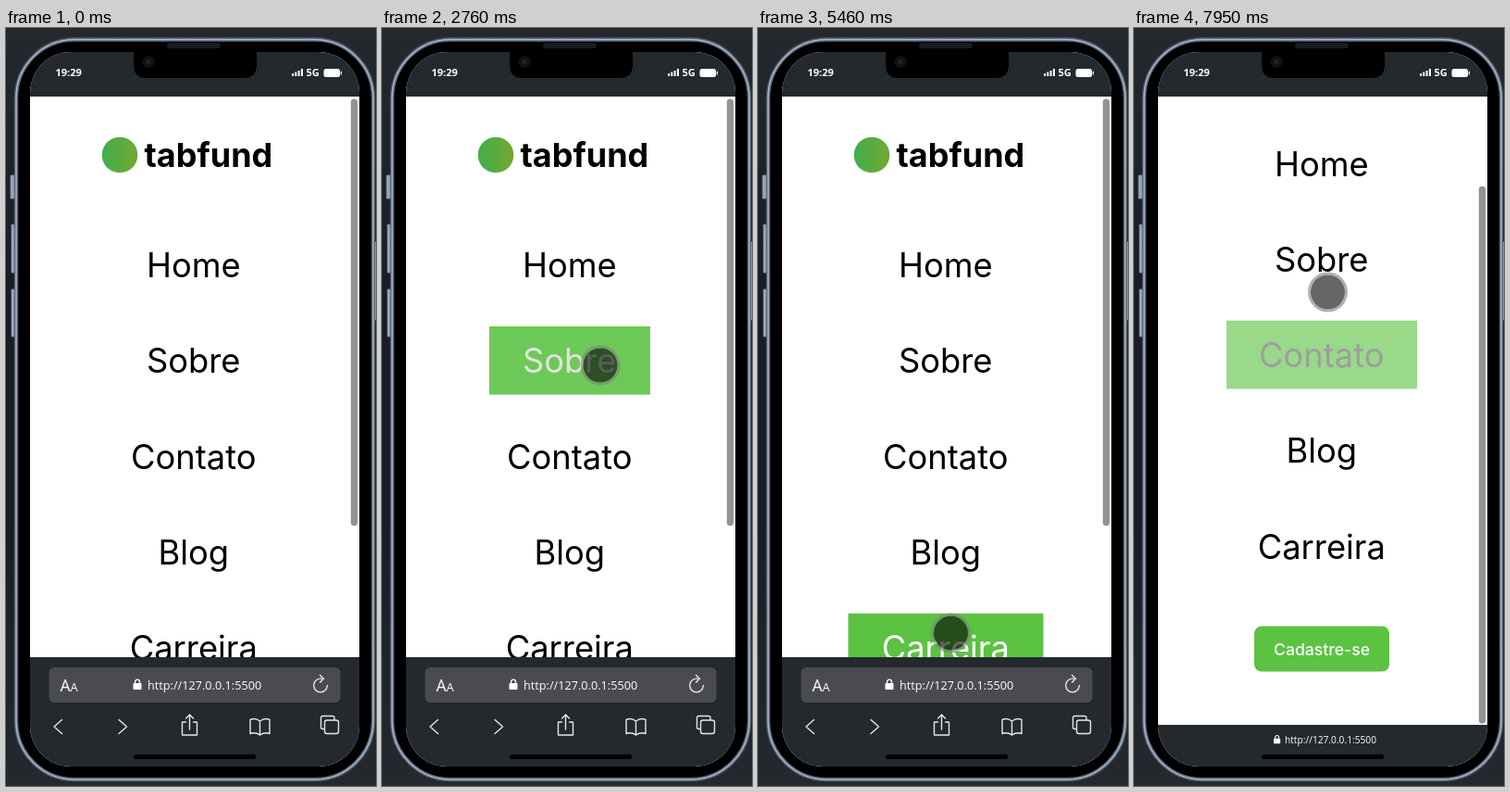
An HTML page that plays this animation: 400x818 px, repeating every 7.99 s.

```html
<!DOCTYPE html>
<html lang="pt-BR">
<head>
<meta charset="utf-8">
<title>Menu no celular</title>
<style>
  html, body { margin: 0; width: 100%; height: 100%; overflow: hidden; background: #22272c; }
  svg { display: block; width: 100%; height: 100%; }
  .page { font-family: Inter, sans-serif; }
  .link { font-size: 36.3px; text-anchor: middle; }
  .system { font-family: "Open Sans", sans-serif; fill: #fff; }
  .icon { fill: none; stroke: #e4e6e8; stroke-width: 1.4; stroke-linecap: round; stroke-linejoin: round; }
</style>
</head>
<body>
<svg viewBox="0 0 400 818">
  <defs>
    <clipPath id="screen"><rect x="26" y="26" width="356" height="771" rx="44"/></clipPath>
    <linearGradient id="backdrop" x2="0" y2="1">
      <stop stop-color="#24292e"/><stop offset=".35" stop-color="#191c25"/>
      <stop offset=".65" stop-color="#191c25"/><stop offset="1" stop-color="#24292e"/>
    </linearGradient>
    <linearGradient id="logo"><stop stop-color="#41ae4b"/><stop offset="1" stop-color="#74a832"/></linearGradient>
    <g id="lock">
      <rect y="4.6" width="9" height="7" rx="1" fill="#fff"/>
      <path d="M2 5V3.2a2.5 2.5 0 0 1 5 0V5" fill="none" stroke="#fff" stroke-width="1.3"/>
    </g>
  </defs>

  <rect width="400" height="818" fill="url(#backdrop)"/>

  <!-- phone body -->
  <g fill="#96a4b6" stroke="#465161">
    <rect x="4.5" y="158.5" width="5" height="26" rx="1.5"/>
    <rect x="5.5" y="211.5" width="4" height="53" rx="1.5"/>
    <rect x="5.5" y="281.5" width="4" height="52" rx="1.5"/>
    <rect x="397.5" y="230.5" width="4" height="85" rx="1.5"/>
  </g>
  <rect x="11" y="12.5" width="386" height="798.5" rx="63" stroke="#556273" stroke-width="4.4"/>
  <rect x="11" y="12.5" width="386" height="798.5" rx="63" fill="none" stroke="#aab7c7" stroke-width="1.5"/>
  <rect x="174" y="16" width="58" height="6" rx="3" fill="#1b1c20"/>

  <g clip-path="url(#screen)">
    <rect x="26" y="26" width="356" height="771" fill="#fff"/>
    <g id="page" class="page">
      <circle cx="123" cy="137" r="19.3" fill="url(#logo)"/>
      <text x="149.5" y="150" font-size="36" font-weight="700">tabfund</text>
      <g id="links"></g>
      <rect x="130" y="755" width="146" height="49" rx="8" fill="#5bc242"/>
      <text x="203" y="786" font-size="17.6" font-weight="500" fill="#fff" text-anchor="middle">Cadastre-se</text>
    </g>
    <rect id="thumb" x="372.8" width="7.3" rx="3.6" fill="#939393"/>

    <rect x="26" y="26" width="356" height="48" fill="#24292e"/>
    <path d="M138 26V40Q138 54 152 54H257Q271 54 271 40V26Z"/>
    <circle cx="154" cy="36.5" r="6.5" fill="#111217"/>
    <circle cx="154" cy="36.5" r="2.5" fill="#22242e"/>
    <g class="system" font-size="11" font-weight="700">
      <text x="53.5" y="52">19:29</text>
      <text x="324.5" y="52">5G</text>
      <path d="M309 49h2v3h-2zM312.3 47.5h2v4.5h-2zM315.6 46h2v6h-2zM318.9 44h2v8h-2z"/>
      <rect x="343.5" y="44" width="17.5" height="9" rx="2.5"/>
      <rect x="361.7" y="46.5" width="1.2" height="4" rx=".6"/>
    </g>

    <g id="fullBar">
      <rect x="26" y="679" width="356" height="118" fill="#24292e"/>
      <rect x="46.5" y="690" width="315" height="38" rx="6" fill="#494b50"/>
      <g class="system">
        <text x="58.5" y="716" font-size="17.5">A<tspan font-size="13">A</tspan></text>
        <use href="#lock" x="137.5" y="702.5"/>
        <text x="153" y="714" font-size="12.7">http://127.0.0.1:5500</text>
      </g>
      <g class="icon">
        <path d="M341 702.2A7.3 7.3 0 1 0 347.3 709.5M339.5 698.5l4 3.700-4 3.800"/>
        <path d="M60.5 746.5 52 754l8.500 7.500M122 746.5l8.500 7.500-8.500 7.500"/>
        <path d="M194.500 749H190.500V763H206.500V749H202.500M198.500 757V741.500M194.500 745l4-4 4 4"/>
        <path d="M274.500 748q-5-4-10.500-1.500V761.500q5.500-2 10.500 1.500 5-3.500 10.500-1.500V746.500q-5.500-2.500-10.500 1.500V763"/>
        <rect x="344.500" y="747" width="15" height="14.500" rx="2.500"/>
        <path d="M344.500 756.500h-2q-2 0-2-2v-10q0-2 2-2h10.500q2 0 2 2v2.500"/>
      </g>
    </g>
    <g id="compactBar">
      <rect x="26" y="752" width="356" height="45" fill="#24292e"/>
      <use href="#lock" transform="translate(151 763) scale(.8)"/>
      <text class="system" x="163" y="772" font-size="10.2">http://127.0.0.1:5500</text>
    </g>
    <rect x="138" y="784" width="132" height="5" rx="2.5"/>
  </g>

  <g id="cursor">
    <circle r="18.6" fill="#000" fill-opacity=".6"/>
    <circle r="20" fill="none" stroke="#808080" stroke-opacity=".62" stroke-width="2.9"/>
  </g>
</svg>

<script>
const LOOP = 7990, FADE = 300, BOX_HEIGHT = 73.7;
const byId = id => document.getElementById(id);
const clamp = v => Math.min(1, Math.max(0, v));
const mix = (a, b, k) => a + (b - a) * k;

// CSS "ease": cubic-bezier(.25, .1, .25, 1)
function ease(x) {
  x = clamp(x);
  let lo = 0, hi = 1;
  for (let i = 0; i < 18; i++) {
    const s = (lo + hi) / 2;
    if (.75 * s * (1 - s) + s ** 3 < x) lo = s; else hi = s;
  }
  return .3 * lo * (1 - lo) ** 2 + 3 * lo * lo * (1 - lo) + lo ** 3;
}

// Two wheel ticks, the second one stopped by the end of the page
const scrollAt = t => 91 * ease((t - 6010) / 160) + 18.5 * ease((t - 6500) / 150);

// Turning points of the pointer: time, x, y
const path = [
  [790, 368, 193], [1085, 250, 218], [1160, 224.5, 237], [1300, 226, 252], [1920, 226, 252],
  [2440, 236, 290], [2760, 236, 364], [3265, 231, 424], [3430, 229, 452], [4590, 212.5, 602],
  [4980, 208.5, 653], [6500, 208.5, 653], [6850, 209, 673], [7300, 209, 618],
  [7700, 209, 389], [7950, 209.5, 285],
];

function pointerAt(t) {
  const i = path.findIndex(p => p[0] > t);
  if (i < 1) return path.at(i).slice(1);
  const [t0, x0, y0] = path[i - 1], [t1, x1, y1] = path[i];
  const k = (t - t0) / (t1 - t0);
  return [mix(x0, x1, k), mix(y0, y1, k)];
}

function addLink(tag, attrs) {
  const node = document.createElementNS('http://www.w3.org/2000/svg', tag);
  for (const name in attrs) node.setAttribute(name, attrs[name]);
  return byId('links').appendChild(node);
}

const labels = { Home: 174, Sobre: 174, Contato: 206, Blog: 152, Carreira: 211 };
const links = Object.entries(labels).map(([label, width], i) => {
  const top = 218.7 + 103.25 * i;
  const box = addLink('rect', { x: 203 - width / 2, y: top, width, height: BOX_HEIGHT, fill: '#5bc242' });
  const text = addLink('text', { x: 202.8, y: top + 50.3, class: 'link' });
  text.textContent = label;
  return { box, text, top, hovers: [] };
});

// Follow the pointer once to find the hover spans; scrolling alone does not change the hover.
let hovered, lastY;
for (let t = path[0][0]; t < LOOP; t += 5) {
  const [, y] = pointerAt(t);
  if (y === lastY) continue;
  lastY = y;
  const pageY = y + scrollAt(t);
  const under = links.find(({ top }) => pageY >= top && pageY < top + BOX_HEIGHT);
  if (under === hovered) continue;
  if (hovered) hovered.hovers.at(-1).end = t;
  if (under) under.hovers.push({ start: t, end: Infinity });
  hovered = under;
}

function draw(t) {
  const scroll = scrollAt(t), compact = t >= 6050;
  byId('page').setAttribute('transform', `translate(0 ${-scroll})`);
  byId('thumb').setAttribute('y', 76.5 + scroll * .86);
  byId('thumb').setAttribute('height', compact ? 580 : 460.5);
  byId('fullBar').style.display = compact ? 'none' : '';
  byId('compactBar').style.display = compact ? '' : 'none';

  for (const { box, text, hovers } of links) {
    const glow = Math.max(0, ...hovers.map(({ start, end }) =>
      ease((t - start) / FADE) * (1 - ease((t - end) / FADE))));
    const grey = Math.round(255 * glow);
    box.setAttribute('opacity', glow);
    text.setAttribute('fill', `rgb(${grey},${grey},${grey})`);
  }

  byId('cursor').style.display = t < path[0][0] ? 'none' : '';
  byId('cursor').setAttribute('transform', `translate(${pointerAt(t)})`);
}

let startTime;
function frame(now) {
  startTime ??= now;
  draw((now - startTime) % LOOP);
  requestAnimationFrame(frame);
}
draw(0);
requestAnimationFrame(frame);
</script>
</body>
</html>
```
